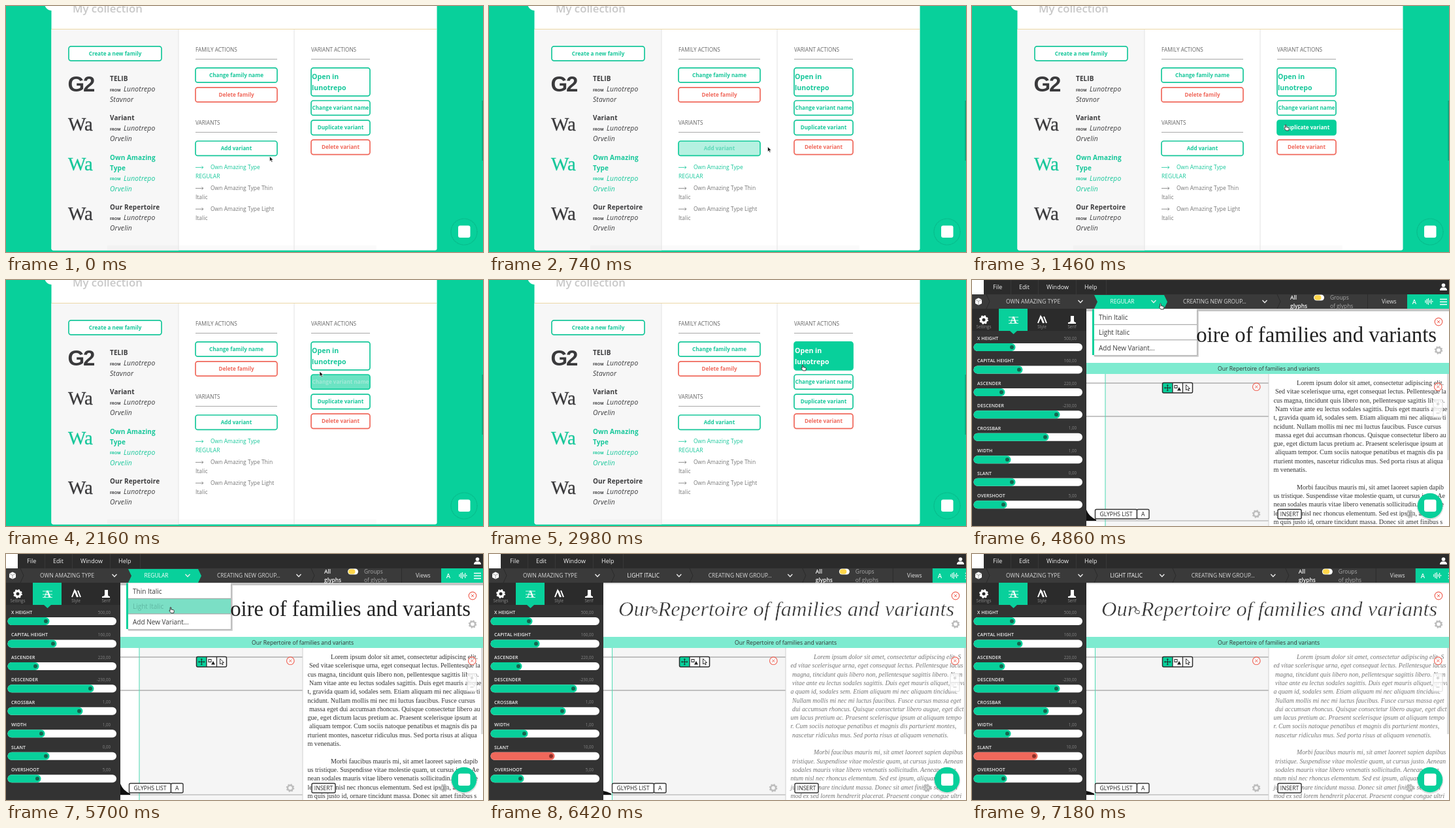
An HTML page for the animation above (7200 ms loop, 730x377 px).

```html
<!DOCTYPE html>
<html lang="en">
<head>
<meta charset="utf-8">
<title>Font variants</title>
<style>
  html, body { margin: 0; width: 100%; height: 100%; overflow: hidden; background: #fff; }
  svg { display: block; width: 730px; height: 377px; }
  text { font-family: "Open Sans", "Noto Sans", sans-serif; white-space: pre; }
  .serif { font-family: "Liberation Serif", "Noto Serif", serif; }
  .grot { font-family: "Liberation Sans", Roboto, sans-serif; }
</style>
</head>
<body>
<svg id="stage" viewBox="0 0 730 377" xmlns="http://www.w3.org/2000/svg"></svg>
<script>
const LOOP = 7200, OPEN_APP = 3200, OPEN_MENU = 4600, PICK = 6100;
const GREEN = '#08d09b', TEAL = '#16c79a', RED = '#f0685b', INK = '#3a3a3c', BAR = '#3a3a3a';

// Markup helpers
const attrs = o => Object.entries(o).map(([k, v]) => ` ${k}="${v}"`).join('');
const rect = (x, y, width, height, fill, more = {}) =>
  `<rect${attrs({ x, y, width, height, fill, ...more })}/>`;
const path = (d, stroke, width = 1, more = {}) =>
  `<path${attrs({ d, stroke, 'stroke-width': width, fill: 'none', ...more })}/>`;
const shape = (d, fill, more = {}) => `<path${attrs({ d, fill, ...more })}/>`;
const disc = (cx, cy, r, fill, more = {}) => `<circle${attrs({ cx, cy, r, fill, ...more })}/>`;
const text = (x, y, size, fill, str, more = {}) =>
  `<text${attrs({ x, y, 'font-size': size, fill, ...more })}>${str}</text>`;
const group = (id, inner) => `<g id="${id}">${inner}</g>`;
const semi = { 'font-weight': 600 };
const bold = { 'font-weight': 700 };
const mid = { 'text-anchor': 'middle' };

function chat(ring) {
  const halo = ring
    ? disc(701, 346, 20, 'none', { stroke: 'rgba(0,80,60,.28)', 'stroke-width': 1.2, 'stroke-dasharray': '1 1' })
    : disc(701, 347, 20.5, 'rgba(0,0,0,.12)');
  return halo + disc(701, 346, 19.2, GREEN) + rect(692, 336.5, 18.5, 18.5, '#fff', { rx: 3 });
}

// Collection page
const buttons = [
  { x: 96, y: 61.8, w: 142, h: 22, label: ['Create a new family'] },
  { x: 290, y: 94.8, w: 125, h: 22.4, label: ['Change family name'] },
  { x: 290, y: 124.8, w: 125, h: 22.4, label: ['Delete family'], color: RED },
  { x: 290, y: 207, w: 125, h: 22.4, label: ['Add variant'] },
  { x: 467, y: 94.8, w: 90, h: 43, label: ['Open in', 'lunotrepo'] },
  { x: 467, y: 145, w: 90, h: 22.4, label: ['Change variant name'] },
  { x: 467, y: 175.2, w: 90, h: 22.4, label: ['Duplicate variant'] },
  { x: 467, y: 205.2, w: 90, h: 22.4, label: ['Delete variant'], color: RED }
];

function button(b, i) {
  const c = b.color || TEAL;
  const label = b.label.length > 1
    ? b.label.map((s, k) => text(b.x + 1, b.y + 16.8 + k * 17, 10.6, c, s, bold)).join('')
    : text(b.x + b.w / 2, b.y + 14, 8.15, c, b.label[0], { ...bold, ...mid });
  return group('b' + i,
    rect(b.x, b.y, b.w, b.h, c, { rx: 3.5, stroke: c, 'stroke-width': 1.7 }) + label);
}

function family(y, sample, names, maker, style, color = INK) {
  const big = sample === 'G2'
    ? text(94.5, y + 15, 33, color, sample, { ...bold, class: 'grot', 'letter-spacing': -2.2 })
    : text(95, y + 15, 29, color, sample, { class: 'serif', stroke: color, 'stroke-width': .3 });
  const end = y + 16 * (names.length - 1);
  const slant = { 'font-style': 'italic', 'letter-spacing': .2 };
  return big +
    names.map((n, i) => text(159, y - .7 + i * 16, 10, color, n, { ...bold, 'letter-spacing': .1 })).join('') +
    text(159, end + 14.8, 5.6, color, 'FROM', bold) +
    text(180, end + 15.3, 10.3, color, maker, slant) +
    text(159, end + 31, 10.3, color, style, slant);
}

const heading = (x, y, w, str) => text(x, y, 8.2, '#666', str) +
  rect(x, y + 10.6, w, 1, '#a8a8a8');

function variant(y, first, second, color) {
  return path(`M290 ${y - 3}h12m-2.5-2l2.5 2l-2.5 2`, color, .8) +
    text(313, y, 8.5, color, first) + text(290, y + 13.3, 8.5, color, second);
}

const collection = rect(0, 0, 730, 377, GREEN) +
  shape('M69.5 0H659.5V371.5q0 3-3 3H72.500q-3 0-3-3z', '#fff') +
  shape('M69.5 36H264V374.5H72.5q-3 0-3-3z', '#f7f7f7') +
  rect(155, 367, 412, 7, '#000', { opacity: .018 }) +
  disc(70, -4, 11, '#fff') +
  text(102, 10, 16.8, '#c8c8c8', 'My collection', semi) +
  rect(70, 35, 589, 1, '#ecd7a6') +
  rect(263.5, 36, 1, 338, '#e4e4e4') + rect(440.5, 36, 1, 338, '#e4e4e4') +
  family(116, 'G2', ['TELIB'], 'Lunotrepo', 'Stavnor') +
  family(176, 'Wa', ['Variant'], 'Lunotrepo', 'Orvelin') +
  family(236.5, 'Wa', ['Own Amazing', 'Type'], 'Lunotrepo', 'Orvelin', TEAL) +
  family(313, 'Wa', ['Our Repertoire'], 'Lunotrepo', 'Orvelin') +
  heading(290, 70.4, 125, 'FAMILY ACTIONS') +
  heading(467, 70.4, 90, 'VARIANT ACTIONS') +
  heading(290, 182.4, 125, 'VARIANTS') +
  buttons.map(button).join('') +
  variant(250.4, 'Own Amazing Type', 'REGULAR', TEAL) +
  variant(282.4, 'Own Amazing Type Thin', 'Italic', '#777') +
  variant(314.2, 'Own Amazing Type Light', 'Italic', '#777') +
  rect(728.5, 145, 1.5, 92, '#0a9f78') + chat(true);

// Editor parts
const gear = (x, y, color, r = 4) =>
  disc(x, y, r, 'none', { stroke: color, 'stroke-width': r * .6 }) +
  disc(x, y, r * 1.35, 'none', { stroke: color, 'stroke-width': r * .45, 'stroke-dasharray': `${r * .53} ${r * .53}` });
const close = (x, y) => disc(x, y, 5.8, '#fff', { stroke: RED, 'stroke-width': 1.2, 'fill-opacity': .5 }) +
  path(`M${x - 2} ${y - 2}l4 4m0-4l-4 4`, RED, 1);
const chevron = (x, y) => path(`M${x - 3.5} ${y - 2}l3.5 3.8l3.5-3.8`, '#eee', 1.3);
const tag = (x, w, str) =>
  rect(x, 351.5, w, 14.5, '#fff', { rx: 2, stroke: '#333', 'stroke-width': 1.4 }) +
  text(x + w / 2, 361.9, 8.6, '#222', str, mid);

const sliders = [
  ['X HEIGHT', 61, '500,00'], ['CAPITAL HEIGHT', 72, '160,00'], ['ASCENDER', 45, '220,00'],
  ['DESCENDER', 129, '-230,00'], ['CROSSBAR', 112, '1,00'], ['WIDTH', 54, '1,00'],
  ['SLANT', 61, '0,00'], ['OVERSHOOT', 48, '5,00']
];

function slider([name, knob, value], i, color = GREEN) {
  const y = 89 + i * 34.45;
  return text(8, y + 2.8, 7, '#eee', name, { ...semi, 'letter-spacing': .08 }) +
    text(160, y + 2.6, 6.2, '#858585', value, { 'text-anchor': 'end' }) +
    rect(2.5, y + 8, 166.5, 12, '#fff', { rx: 6 }) +
    rect(2.5, y + 8, knob + 3, 12, color, { rx: 6 }) +
    disc(knob, y + 14, 3, color === RED ? '#8d2f28' : '#14654f');
}

function sidebar(light) {
  const small = (x, s) => text(x, 74, 6.2, '#8b8b8b', s, mid);
  return rect(0, 44, 175, 333, '#333') + rect(0, 44, 175, 34, '#2b2b2b') +
    rect(41, 44, 44, 34, GREEN) + shape('M58 78h11l-5.5 5z', GREEN) +
    disc(18, 61, 4, 'none', { stroke: '#fff', 'stroke-width': 3 }) + gear(18, 61, '#fff', 4.4) +
    small(18, 'Settings') + small(107, 'Style') + small(153, 'Serif') +
    text(63.5, 66, 15, '#fff', 'A', { ...mid, ...bold, class: 'serif' }) +
    path('M56 57h15M56 62h15M56 66.5h15', '#fff', .8) +
    path('M101 66l4-10l4 10', '#fff', 2) + path('M106 56l4 10m0-10l4 10', '#fff', 2) +
    shape('M151 55h5v7q0 3 3 3v2h-12v-2q4 0 4-3z', '#fff') +
    sliders.map((s, i) => light && i === 6 ? slider(['SLANT', 95, '10,00'], i, RED) : slider(s, i)).join('');
}

function topbar(light) {
  const dx = light ? 12.8 : 0;
  const menus = [[32, 'File'], [72, 'Edit'], [114, 'Window'], [172, 'Help']];
  const tip = x => path(`M${x} 22l5 11l-5 11`, '#2a2a2a', 1);
  const tail = text(323, 36.2, 8.4, '#d8d8d8', 'CREATING NEW GROUP...') + chevron(448, 33) + tip(467) +
    text(487, 30, 8.4, '#fff', 'All', semi) + text(487, 43, 8.4, '#fff', 'glyphs', semi) +
    rect(523, 22.5, 16, 9, '#fff', { rx: 4.5 }) + rect(524, 23.2, 10.5, 7.6, '#ffd64a', { rx: 3.8 }) +
    text(548, 30, 8.4, '#a8a8a8', 'Groups') + text(548, 43, 8.4, '#a8a8a8', 'of glyphs') +
    rect(605, 22, 1, 22, '#2c2c2c') + text(627, 36.2, 8.6, '#ddd', 'Views') +
    rect(666, 22, 66, 22, GREEN) +
    text(677, 36.6, 9.5, '#fff', 'A', { ...mid, ...semi }) +
    path('M694 31v4m2.2-6v8m2.2-9v10m2.2-7v4m2.2-6v8m2-5v2', '#fff', 1.1) +
    path('M716 29.5h11m-11 4h11m-11 4h11', '#fff', 1.5);
  return rect(0, 0, 730, 22, '#2b2b2b') + rect(0, 22, 730, 22, BAR) +
    rect(0, 0, 18, 22, '#fff') +
    menus.map(([x, s]) => text(x, 13.6, 9, '#f2f2f2', s)).join('') +
    [59, 101, 159, 205].map(x => rect(x, 0, 1, 22, '#383838')).join('') +
    disc(721.5, 8, 2.8, '#fff') + shape('M716 16q0-4 3.5-4.5h4q3.5 .5 3.5 4.5z', '#fff') +
    shape('M5 30l5-2.5l5 2.5v6l-5 2.5l-5-2.5z', '#fff') + path('M5 30l5 2.5l5-2.5M10 32.5v6', '#777', .7) +
    tip(22) + text(52, 36.2, 8.4, '#d8d8d8', 'OWN AMAZING TYPE', { 'letter-spacing': .1 }) + chevron(166, 33) +
    (light ? tip(187) + tip(307)
      : shape('M187 23H294l5 10.5l-5 10.5H187l5-10.5z', BAR, { id: 'tab' })) +
    text(211.5, 36.2, 8.4, '#fff', light ? 'LIGHT ITALIC' : 'REGULAR') + chevron(278 + dx, 33) +
    `<g transform="translate(${dx})">${tail}</g>`;
}

// A leading space or tab marks a small or a paragraph indent
const regularText = `\tLorem ipsum dolor sit amet, consectetur adipiscing elit.
 Sed vitae scelerisque urna, eget consequat lectus. Pellentesque la
cus magna, tincidunt quis libero non, pellentesque sagittis libero.
 Nam vitae ante eu lectus sodales sagittis. Duis eget mauris alique
t, gravida quam id, sodales sem. Etiam aliquam mi nec aliquam ti
ncidunt. Nullam mollis mi nec mi luctus faucibus. Fusce cursus
 massa eget dui accumsan rhoncus. Quisque consectetur libero au
gue, eget dictum lacus pretium ac. Praesent scelerisque ipsum at
 aliquam tempor. Cum sociis natoque penatibus et magnis dis pa
rturient montes, nascetur ridiculus mus. Sed porta risus at aliqua
m venenatis.

\tMorbi faucibus mauris mi, sit amet laoreet sapien dapib
us tristique. Suspendisse vitae molestie quam, ut cursus justo. Ae
nean sodales mauris vitae libero venenatis sollicitudin. Aenean e
lementum nisl nec rhoncus elementum. Sed est ipsum, aliqua
m quis justo id, ornare tincidunt massa. Donec sit amet finibus s`;
const lightText = `\tLorem ipsum dolor sit amet, consectetur adipiscing elit. S
ed vitae scelerisque urna, eget consequat lectus. Pellentesque lacus
 magna, tincidunt quis libero non, pellentesque sagittis libero. Nam
 vitae ante eu lectus sodales sagittis. Duis eget mauris aliquet, gravid
a quam id, sodales sem. Etiam aliquam mi nec aliquam tincidunt.
 Nullam mollis mi nec mi luctus faucibus. Fusce cursus massa eget
 dui accumsan rhoncus. Quisque consectetur libero augue, eget dict
um lacus pretium ac. Praesent scelerisque ipsum at aliquam tempo
r. Cum sociis natoque penatibus et magnis dis parturient montes,
 nascetur ridiculus mus. Sed porta risus at aliquam venenatis.

\tMorbi faucibus mauris mi, sit amet laoreet sapien dapibus
 tristique. Suspendisse vitae molestie quam, ut cursus justo. Aenean
 sodales mauris vitae libero venenatis sollicitudin. Aenean eleme
ntum nisl nec rhoncus elementum. Sed est ipsum, aliquam quis
justo id, ornare tincidunt massa. Donec sit amet finibus sem, com
mod ex sed lorem hendrerit placerat. Praesent congue congue ultri`;

function editor(light) {
  const face = light ? { class: 'serif', 'font-style': 'italic' } : { class: 'serif' };
  // A white outline thins the large light face
  const titleFace = light ? { ...face, stroke: '#fff', 'stroke-width': .55 } : face;
  const ink = light ? '#757575' : '#333';
  const lead = { '\t': 497, ' ': 464 };
  const lines = (light ? lightText : regularText).split('\n').map((s, i) =>
    text(lead[s[0]] || 461.5, 161 + i * 13.3, light ? 9.78 : 10.1, ink, s.trim(), face)).join('');
  const edge = light ? 188 : 203.5;
  return rect(0, 0, 730, 377, '#fff') +
    rect(175, 44, 555, light ? 2 : 4, light ? '#ddd' : '#c6c6c6') +
    text(light ? 198 : 196.5, 95, light ? 32.5 : 32.8, light ? '#333' : '#222',
      'Our Repertoire of families and variants', titleFace) +
    rect(175, 127, 555, 17, '#7debd0') +
    text(454, 138.8, 8.65, '#333', 'Our Repertoire of families and variants', mid) +
    rect(edge, 144, 454 - edge, 233, '#f5f5f5') +
    rect(175, 157.5, 279, 1, '#8c8c8c') + rect(175, 208.5, 279, 1, '#8c8c8c') +
    rect(175, 368.5, 279, 1, '#a5a5a5') +
    rect(edge, 144, 1, 233, '#4fdcb4') + rect(453.5, 144, 1, 233, '#d0d0d0') +
    shape(light ? 'M175 363q5 1 12 4v2h-12z' : 'M175 352q4 11 15 15v2h-15z', '#111') +
    lines +
    rect(727, 144, 3, 132, '#dcdcdc') +
    rect(706, 183.5, 14, 27, '#fff', { stroke: '#ddd', rx: 1, 'fill-opacity': .8 }) +
    path('M706 197h14', '#ddd') + path('M710.5 190h5m-2.5-2.5v5M710.5 204h5', '#c0c0c0') +
    rect(291.5, 157.5, 46, 15.5, '#fff', { rx: 2 }) + rect(291.5, 157.5, 15.5, 15.5, GREEN, { rx: 2 }) +
    rect(291.5, 157.5, 46, 15.5, 'none', { rx: 2, stroke: '#2c2c2c', 'stroke-width': 1.5 }) +
    path('M307 157.5v15.5m15.5-15.5v15.5', '#2c2c2c', 1.3) +
    path('M299.3 160.8v9m-4.5-4.5h9', '#222', 1) +
    path('M298 162l1.3-1.5l1.3 1.5m-2.6 6.6l1.3 1.5l1.3-1.5m-4.6-4.6l-1.5 1.3l1.5 1.3m6.6-2.6l1.5 1.3l-1.5 1.3', '#222', .8) +
    rect(310, 161.5, 4, 4, 'none', { stroke: '#222' }) + shape('M314 169.5l3-5.5l3 5.5z', '#222') +
    path('M327.5 160.5v8.5l2-2l1.5 3l1.3-.7l-1.4-2.8h2.6z', '#222', .9) +
    close(435.3, 163.7) + close(714, 64) + close(713.3, 163.7) +
    gear(714, 107.5, '#bdbdbd') + gear(435, 358.5, '#bdbdbd') + gear(670, 358.5, '#bdbdbd') +
    tag(188.5, 64, 'GLYPHS LIST') + tag(252.5, 18.5, 'A') + tag(468, 36, 'INSERT') +
    sidebar(light) + topbar(light) + chat(false);
}

const choices = ['Thin Italic', 'Light Italic', 'Add New Variant...'];
const dropdown = rect(187, 48, 160, 70, '#000', { opacity: .16, rx: 1 }) +
  rect(186, 47, 159.5, 69.5, '#000', { opacity: .14 }) +
  rect(184, 44.5, 160, 70.5, '#fff') +
  rect(187, 68.5, 157, 23, '#7bdfc5', { id: 'row' }) +
  rect(184, 44.5, 3, 70.5, GREEN) +
  rect(187, 67.8, 157, 1, '#999') + rect(187, 91.3, 157, 1, '#999') +
  choices.map((s, i) => text(194, 60.5 + i * 23.5, 10, '#3b3b3b', s, { id: 'c' + i })).join('');

const pointer = group('arrow',
    shape('M0 0v7.5l1.8-1.6l1.3 2.9l1.3-.6l-1.3-2.8h2.5z', '#111', { stroke: '#fff', 'stroke-width': .6 })) +
  group('hand', shape('M-.8 1q.8-1.3 1.6 0v3l3.7 .9q1 .4 .8 1.5l-.6 3h-4.2l-2.7-3.5q.3-1.2 1.4-.2z',
    '#fff', { stroke: '#222', 'stroke-width': .9 }));

document.getElementById('stage').innerHTML =
  group('collection', collection) + group('regular', editor(false)) + group('light', editor(true)) +
  group('menu', dropdown) + group('pointer', pointer);
const el = id => document.getElementById(id);

// Pointer stops: time, x, y
const stops = [
  [0, 403.5, 230.5], [450, 403.5, 230.5], [1250, 480, 181.5], [1700, 480, 181.5],
  [2350, 480, 129.5], [3250, 480, 129.5], [3900, 298, 42], [4060, 298, 42],
  [4400, 288.5, 35.5], [5000, 288.5, 35.5], [5550, 252, 81], [6300, 252, 81],
  [6900, 251, 82], [7200, 251, 82]
];
const ease = p => p * p * (3 - 2 * p);

function place(t) {
  t = Math.min(Math.max(t, 0), LOOP);
  const i = Math.max(1, stops.findIndex(s => s[0] >= t));
  const [a, x, y] = stops[i - 1], [b, u, v] = stops[i];
  const p = ease((t - a) / (b - a));
  return [x + (u - x) * p, y + (v - y) * p];
}

const inside = (t, { x, y, w, h }) => {
  const [px, py] = place(t);
  return px >= x && px <= x + w && py >= y && py <= y + h;
};
// Hover fades in and out over 150 ms
function hover(t, box) {
  let n = 0;
  for (let k = 0; k < 10; k++) n += inside(t - k * 15, box);
  return n / 10;
}
function mix(a, b, p) {
  const part = (c, i) => parseInt(c.slice(1 + 2 * i, 3 + 2 * i), 16);
  return `rgb(${[0, 1, 2].map(i => Math.round(part(a, i) + (part(b, i) - part(a, i)) * p))})`;
}
const show = (id, on) => el(id).setAttribute('visibility', on ? 'visible' : 'hidden');

const tabBox = { x: 187, y: 23, w: 112, h: 21 };
const rowBox = { x: 187, y: 68, w: 157, h: 23 };

function render(t) {
  const inApp = t >= OPEN_APP, picked = t >= PICK;
  const open = t >= OPEN_MENU && !picked;
  show('collection', !inApp);
  show('regular', inApp && !picked);
  show('light', picked);
  show('menu', open);

  if (!inApp) buttons.forEach((b, i) => {
    const p = hover(t, b), node = el('b' + i), c = b.color || TEAL;
    const full = b.color || GREEN;
    node.firstChild.setAttribute('fill', mix('#ffffff', full, p));
    node.firstChild.setAttribute('stroke', mix(c, full, p));
    node.querySelectorAll('text').forEach(n => n.setAttribute('fill', mix(c, '#ffffff', p)));
  });
  el('tab').setAttribute('fill', mix(BAR, GREEN, open ? 1 : hover(t, tabBox)));
  const p = open ? hover(t, rowBox) : 0;
  el('row').setAttribute('opacity', p);
  el('c1').setAttribute('fill', mix('#3b3b3b', '#5fb7a2', p));

  const hand = inApp ? t > 3850 : buttons.some(b => inside(t, b));
  show('hand', hand);
  show('arrow', !hand);
  const [x, y] = place(t);
  el('pointer').setAttribute('transform', `translate(${x.toFixed(2)} ${y.toFixed(2)})`);
}

const start = performance.now();
function tick() {
  render((performance.now() - start) % LOOP);
  requestAnimationFrame(tick);
}
tick();
</script>
</body>
</html>
```
